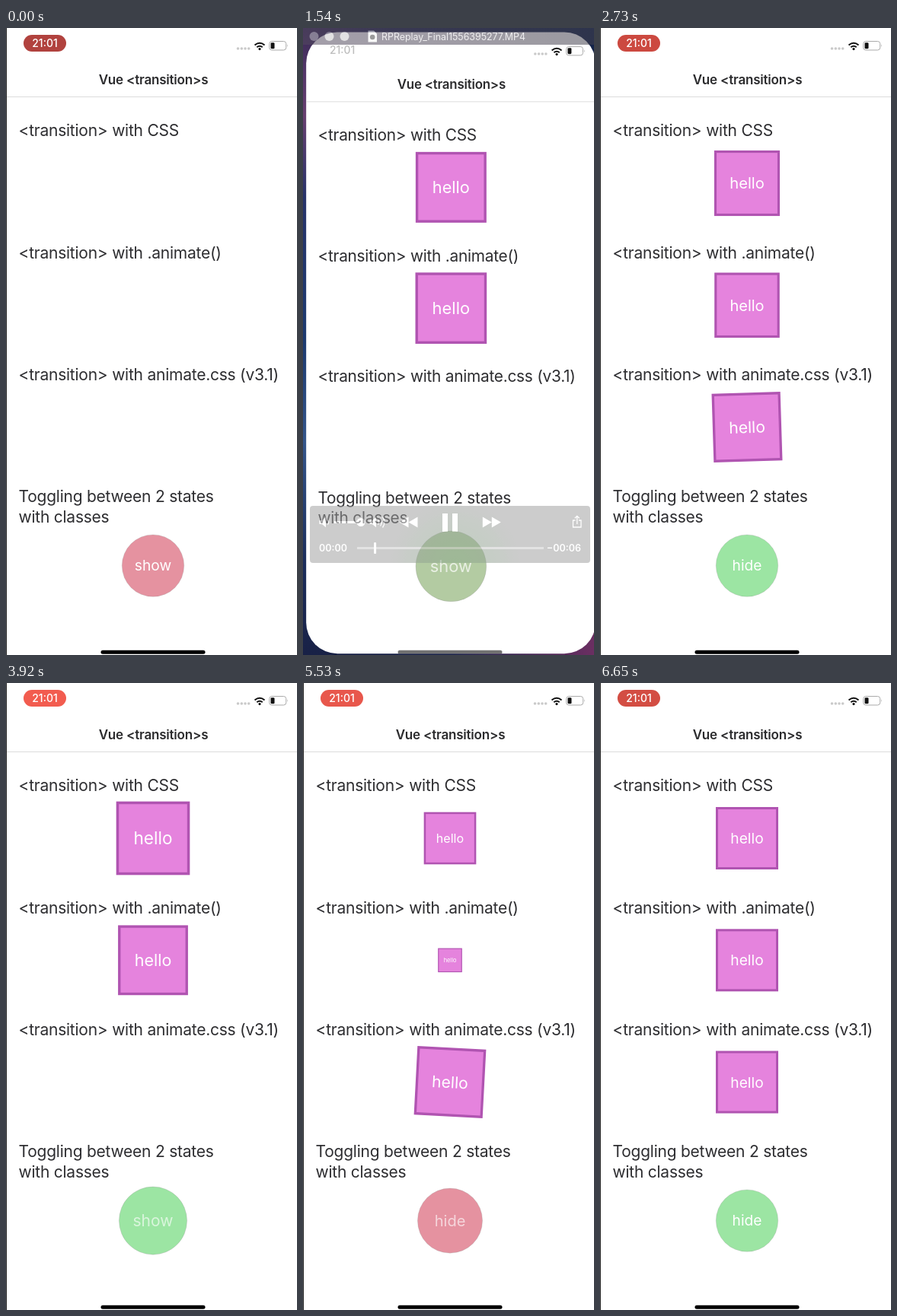
These frames come from a looping animation (382 px wide and 824 px high, 6.72 s). An HTML page:

```html
<!DOCTYPE html>
<html lang="en">
<head>
<meta charset="utf-8">
<title>Vue transitions</title>
<style>
  html, body { margin: 0; width: 100%; height: 100%; overflow: hidden; background: #222; }
  svg { display: block; width: 100vw; height: 100vh; }
  text { font-family: Inter, Roboto, "Liberation Sans", sans-serif; }
  .line { font-size: 21px; letter-spacing: -.24px; fill: #2d2d30; }
  .label { font-size: 19.2px; text-anchor: middle; fill: #fff; }
  .clock { font-size: 14px; font-weight: 500; text-anchor: middle; }
  .time { font-size: 12.5px; font-weight: 600; fill: #fff; }
</style>
</head>
<body>
<svg viewBox="0 0 382 824" preserveAspectRatio="none">
  <defs>
    <linearGradient id="sky" x1="0" y1="0" x2="0" y2="1">
      <stop offset="0" stop-color="#3a2a55"/>
      <stop offset=".07" stop-color="#54366a"/>
      <stop offset=".14" stop-color="#683f70"/>
      <stop offset=".27" stop-color="#27336a"/>
      <stop offset=".5" stop-color="#1c3a70"/>
      <stop offset=".66" stop-color="#34558a"/>
      <stop offset=".85" stop-color="#1b2d5c"/>
      <stop offset="1" stop-color="#182146"/>
    </linearGradient>
    <linearGradient id="night">
      <stop offset="0" stop-color="#20264a" stop-opacity="0"/>
      <stop offset=".3" stop-color="#20264a"/>
      <stop offset="1" stop-color="#14244a"/>
    </linearGradient>
    <linearGradient id="dusk">
      <stop offset=".5" stop-color="#6b2f62" stop-opacity="0"/>
      <stop offset="1" stop-color="#6b2f62"/>
    </linearGradient>
    <linearGradient id="bar">
      <stop offset="0" stop-color="#554b60"/>
      <stop offset="1" stop-color="#45434f"/>
    </linearGradient>
    <radialGradient id="glow" gradientUnits="userSpaceOnUse" cx="200" cy="706" r="85">
      <stop offset="0" stop-color="#8cab8c"/>
      <stop offset=".45" stop-color="#92a492"/>
      <stop offset="1" stop-color="#a0a0a0"/>
    </radialGradient>
    <clipPath id="cardClip"><rect id="cardShape"/></clipPath>
  </defs>

  <g id="wallpaper">
    <rect width="382" height="824" fill="url(#sky)"/>
    <rect width="382" height="90" fill="url(#night)"/>
    <rect y="740" width="382" height="84" fill="url(#dusk)"/>
  </g>

  <g clip-path="url(#cardClip)">
    <rect width="382" height="824" fill="#fff"/>
    <g id="screen">
      <g id="pill">
        <rect id="pillShape" x="-28" y="-11" width="56" height="22" rx="11"/>
        <text class="clock" y="5" fill="#fff">21:01</text>
      </g>
      <text id="clock" class="clock" x="49" y="27" fill="#bdbdbd">21:01</text>
      <g fill="#cacaca">
        <circle cx="304.5" cy="27" r="1.8"/><circle cx="309.3" cy="27" r="1.8"/>
        <circle cx="314" cy="27" r="1.8"/><circle cx="318.7" cy="27" r="1.8"/>
      </g>
      <g fill="none" stroke="#111" stroke-width="2">
        <path d="M326.5 22.5Q333 17 339.5 22.5"/>
        <path d="M329.3 25.3Q333 22.3 336.7 25.3"/>
      </g>
      <circle cx="333" cy="27.6" r="1.6" fill="#111"/>
      <rect x="345.7" y="17.5" width="22" height="11.5" rx="3.2" fill="none" stroke="#aaa"/>
      <rect x="347.5" y="19.2" width="5" height="8" rx="1.3" fill="#111"/>
      <path d="M369.3 21.2Q371 23.2 369.3 25.2Z" fill="#aaa"/>
      <text x="193.5" y="73.7" text-anchor="middle" font-size="17" font-weight="600" letter-spacing="-.2" fill="#2b2b2d">Vue &lt;transition&gt;s</text>
      <path d="M0 90.5H384" stroke="#dcdcdc"/>
      <g id="lines"></g>
      <g id="boxes"></g>
      <g id="button">
        <circle id="disc" r="40.7" stroke="#999" stroke-opacity=".35" stroke-width=".8"/>
        <text id="buttonLabel" class="label" y="6.8"></text>
      </g>
    </g>
    <rect id="home" x="124.5" y="817.7" width="137" height="5" rx="2.5" fill="#000"/>
  </g>

  <g id="chrome">
    <rect width="382" height="22" fill="url(#bar)"/>
    <g fill="#c9c8ca">
      <circle cx="14.5" cy="11" r="6"/><circle cx="34.5" cy="11" r="6"/><circle cx="54.5" cy="11" r="6"/>
    </g>
    <path d="M85.5 3.5H93L97 7.5V18.5H85.5Z" fill="#f2f2f2"/>
    <circle cx="91.2" cy="12" r="3.3" fill="#444"/>
    <text x="103" y="15.5" font-size="12.4" fill="#e2e0e3">RPReplay_Final1556395277.MP4</text>

    <rect x="9" y="628" width="368" height="75" rx="4" fill="url(#glow)"/>
    <g fill="#fff">
      <path id="speaker" d="M21.5 647H25L30 642.8V656.2L25 652H21.5Z"/>
      <use href="#speaker" x="66"/>
      <circle cx="76" cy="649.5" r="5.5"/>
      <path id="back" d="M138.5 642.5V656.5L126.5 649.5ZM150.5 642.5V656.5L138.5 649.5Z"/>
      <use href="#back" transform="translate(386.3 0) scale(-1 1)"/>
      <path d="M183 638H190V662H183ZM196 638H203V662H196Z"/>
    </g>
    <g fill="none" stroke="#fff" stroke-width="1.3">
      <path d="M32.5 646.5Q35 649.5 32.5 652.5M98.5 646.5Q101 649.5 98.5 652.5M101.5 644.5Q105 649.5 101.5 654.5M104.5 642.5Q109.5 649.5 104.5 656.5"/>
      <path d="M357.5 647H354.5V656H365V647H362M359.8 652V641.5M356.8 644.3L359.8 641.3L362.8 644.3"/>
      <path d="M41 649.5H72" stroke-width="3"/>
    </g>
    <path d="M71 683.5H316" stroke="#c9c9c9" stroke-width="3"/>
    <rect id="playhead" y="676" width="3" height="15" rx="1" fill="#fff"/>
    <text id="elapsed" class="time" x="21" y="688"></text>
    <text id="remaining" class="time" x="365" y="688" text-anchor="end"></text>
  </g>
</svg>

<script>
const LOOP = 6720, STEP = 70;
const REPLAY = 910, PLAY = 980, SETTLED = 2170;
const TOGGLES = [
  { at: 1050, shown: false },
  { at: 1910, shown: true },
  { at: 3500, shown: false },
  { at: 5230, shown: true }
];
const PINK = [229, 146, 160], GREEN = [156, 229, 163];
const $ = id => document.getElementById(id);
const clamp = v => Math.max(0, Math.min(1, v));
const ramp = (t, a, b) => clamp((t - a) / (b - a));
const mix = (a, b, u) => a + (b - a) * u;
const blend = (a, b, u) => `rgb(${a.map((v, i) => Math.round(mix(v, b[i], u)))})`;

function set(el, attrs) {
  for (const k in attrs) el.setAttribute(k, attrs[k]);
}

function add(parent, tag, attrs, text) {
  const el = document.createElementNS("http://www.w3.org/2000/svg", tag);
  set(el, attrs);
  if (text) el.textContent = text;
  return parent.appendChild(el);
}

// Linear interpolation through [time, value] pairs.
function keys(t, list) {
  if (t <= list[0][0]) return list[0][1];
  for (let i = 1; i < list.length; i++) {
    const [a, from] = list[i - 1], [b, to] = list[i];
    if (t < b) return mix(from, to, (t - a) / (b - a));
  }
  return list[list.length - 1][1];
}

[
  [142, "<transition> with CSS"],
  [302.5, "<transition> with .animate()"],
  [462.5, "<transition> with animate.css (v3.1)"],
  [623, "Toggling between 2 states"],
  [649.5, "with classes"]
].forEach(([y, s]) => add($("lines"), "text", { class: "line", x: 16.5, y }, s));

const BOX_Y = [204, 364.3, 524.5];
const boxes = BOX_Y.map(() => {
  const g = add($("boxes"), "g", {});
  add(g, "rect", { x: -39.5, y: -39.5, width: 79, height: 79, fill: "#e583dd", stroke: "#b054b1", "stroke-width": 3 });
  add(g, "text", { class: "label", y: 7 }, "hello");
  return g;
});

function cssBox(t, shown) {
  return { scale: keys(t, shown ? [[0, 0], [430, 1.2], [950, 1]] : [[0, 1], [470, 1.2], [900, 0]]) };
}

function scriptBox(t, shown) {
  const u = t - 165;
  if (!shown) return { scale: keys(u, [[0, 1], [425, 1.2], [855, 0]]) };
  return { scale: u < 0 ? 1.02 : keys(u, [[0, 0], [420, 1.2], [720, 1]]) };
}

function libraryBox(t, shown) {
  if (shown) {
    const wobble = [[0, 0], [100, -3], [200, -3]];
    for (let i = 3; i < 10; i++) wobble.push([i * 100, i % 2 ? 3 : -3]);
    wobble.push([1000, 0]);
    return {
      scale: keys(t, [[0, 1], [100, .9], [200, .9], [300, 1.1], [900, 1.1], [1000, 1]]),
      turn: keys(t, wobble)
    };
  }
  const u = ramp(t, 200, 1000);
  return { scale: u < 1 ? 1 : 0, dx: t < 200 ? -20 * t / 200 : mix(-20, 2000, 1 - (1 - u) ** 2), alpha: 1 - u };
}

const motions = [cssBox, scriptBox, libraryBox];

function drawBoxes(t, shown) {
  boxes.forEach((g, i) => {
    const { scale, turn = 0, dx = 0, alpha = 1 } = motions[i](t, shown);
    set(g, {
      transform: `translate(${193 + dx} ${BOX_Y[i]}) rotate(${turn}) scale(${scale})`,
      opacity: scale > 0 ? alpha : 0
    });
  });
}

function drawButton(t, shown) {
  const scale = keys(t, [[0, 1], [120, .9], [300, 1.045], [420, 1.095], [520, 1.17], [800, 1]]);
  const [from, to] = shown ? [PINK, GREEN] : [GREEN, PINK];
  $("button").setAttribute("transform", `translate(193 706.6) scale(${scale})`);
  $("disc").setAttribute("fill", blend(from, to, ramp(t, 430, 620)));
  $("buttonLabel").textContent = shown ? "hide" : "show";
  $("buttonLabel").setAttribute("opacity", keys(t, [[0, 1], [120, 1], [300, .62], [440, .62], [650, 1]]));
}

function drawStatus(t) {
  const q = t < REPLAY ? 1 : ramp(t, 1600, 2300);
  const beat = .5 + .5 * Math.cos((t - 3800) / 2100 * 2 * Math.PI);
  set($("pill"), { transform: `translate(51 20) scale(${.65 + .35 * q})`, opacity: q });
  set($("pillShape"), { fill: t < REPLAY ? "#b1423e" : blend([204, 73, 64], [243, 93, 80], beat) });
  set($("clock"), { opacity: 1 - ramp(q, 0, .4) });
}

function drawCard(t) {
  const opening = t >= REPLAY && t < SETTLED;
  const p = !opening ? 1 : t < PLAY ? 0 : 1 - Math.exp((PLAY - t) / 360);
  const x = mix(16, 1, p), y = mix(33, -2, p);
  set($("cardShape"), {
    x, y, width: 384 - x, height: mix(808, 826, p) - y,
    rx: opening ? 41 : 0
  });
  $("screen").setAttribute("transform", `translate(${mix(14.7, 0, p)} ${mix(34.1, 0, p)}) scale(${mix(.957, 1, p)})`);
  set($("wallpaper"), { opacity: opening ? 1 : 0 });
  set($("home"), { opacity: opening ? .7 * p : 1 });
}

function drawPlayer(t) {
  const seconds = t < REPLAY ? 6 : Math.max(0, t - PLAY) / 1000;
  const whole = Math.floor(seconds);
  set($("chrome"), { opacity: t < 1300 ? ramp(t, 700, 910) : 1 - ramp(t, 1400, 1700) });
  set($("playhead"), { x: 70.5 + 242 * seconds / 6 });
  $("elapsed").textContent = "00:0" + whole;
  $("remaining").textContent = "\u221200:0" + (6 - whole);
}

function draw(t) {
  let toggle = { at: -5000, shown: t >= REPLAY };
  for (const s of TOGGLES) if (t >= s.at) toggle = s;
  drawBoxes(t - toggle.at, toggle.shown);
  drawButton(t - toggle.at, toggle.shown);
  drawStatus(t);
  drawCard(t);
  drawPlayer(t);
}

const start = performance.now();
function tick() {
  const t = (performance.now() - start) % LOOP;
  draw(Math.floor(t / STEP) * STEP);
  requestAnimationFrame(tick);
}
tick();
</script>
</body>
</html>
```
